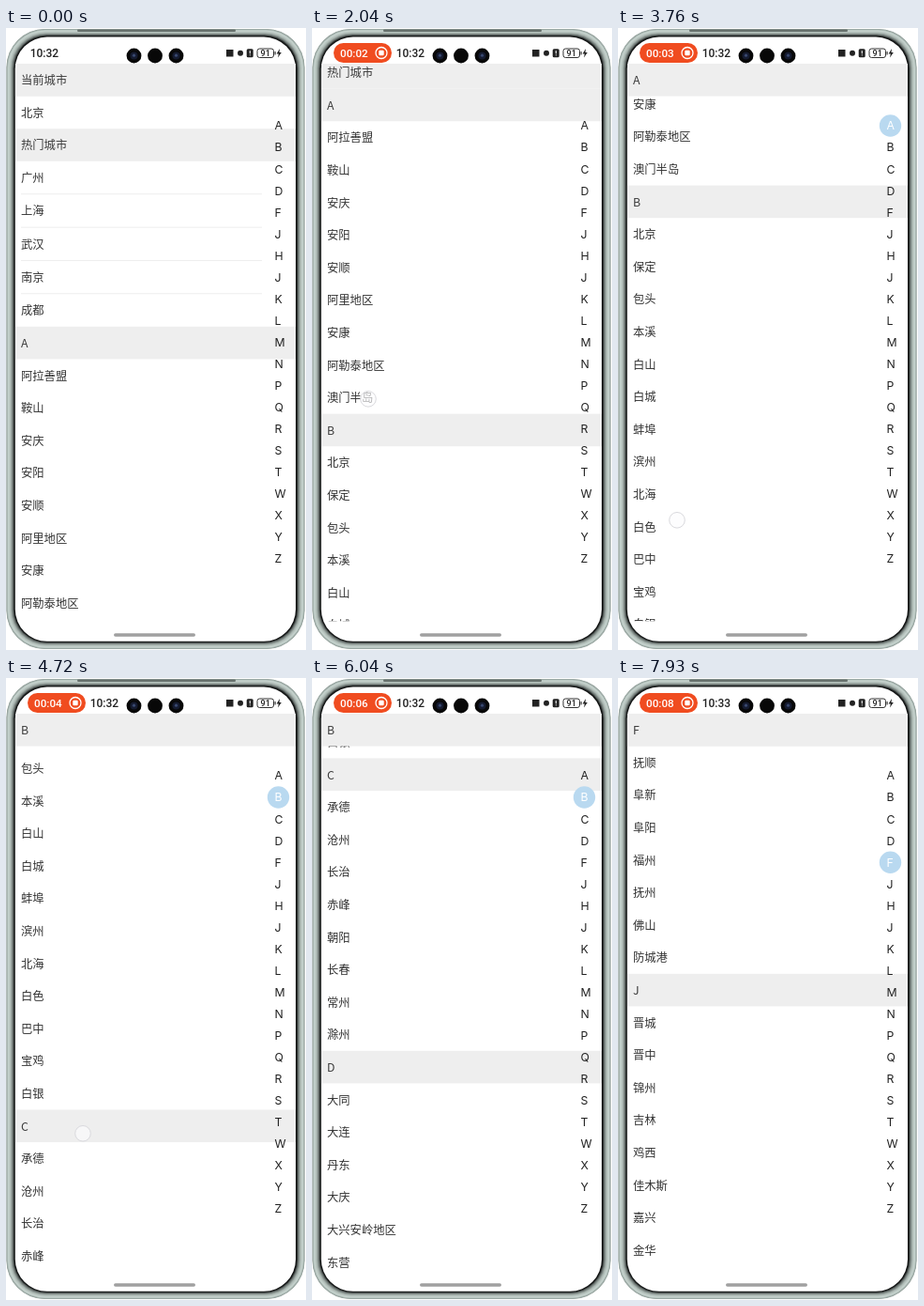
Write an HTML page with a canvas that moves like this. It is 320x662 px and loops after 8000 ms.

```html
<!DOCTYPE html>
<html lang="zh-CN">
<head>
<meta charset="utf-8">
<title>城市列表</title>
<style>
  html, body { margin: 0; width: 100%; height: 100%; overflow: hidden; background: #fff; }
  canvas { display: block; width: 320px; height: 662px; }
</style>
</head>
<body>
<canvas id="stage"></canvas>
<script>
const LOOP = 8000, ROW = 34.6, DIVIDER = 0.75;
const LEFT = 9.8, RIGHT = 309, LIST_TOP = 38, LIST_BOTTOM = 631.3;
const CJK = '12.3px "Noto Sans CJK SC", "Noto Sans CJK", sans-serif';
const INDEX = 'ABCDFJHJKLMNPQRSTWXYZ';

const canvas = document.getElementById('stage');
const ctx = canvas.getContext('2d');
const ratio = window.devicePixelRatio || 1;
canvas.width = 320 * ratio;
canvas.height = 662 * ratio;

const sections = [
  ['当前城市', '北京'],
  ['热门城市', '广州 上海 武汉 南京 成都'],
  ['A', '阿拉善盟 鞍山 安庆 安阳 安顺 阿里地区 安康 阿勒泰地区 澳门半岛'],
  ['B', '北京 保定 包头 本溪 白山 白城 蚌埠 滨州 北海 白色 巴中 宝鸡 白银'],
  ['C', '承德 沧州 长治 赤峰 朝阳 长春 常州 滁州'],
  ['D', '大同 大连 丹东 大庆 大兴安岭地区 东营 德州 东莞 德阳 达州 大理 德宏 迪庆 定西 儋州 登封'],
  ['F', '抚顺 阜新 阜阳 福州 抚州 佛山 防城港'],
  ['J', '晋城 晋中 锦州 吉林 鸡西 佳木斯 嘉兴 金华 济南 济宁'],
].map(([title, names]) => ({ title, names: names.split(' ') }));

let contentHeight = 0;
for (const section of sections) {
  section.divided = section.title === '热门城市';
  section.pitch = ROW + (section.divided ? DIVIDER : 0);
  section.top = contentHeight;
  contentHeight += ROW + section.names.length * section.pitch - (section.divided ? DIVIDER : 0);
}

// Time (ms) and scroll offset, joined by a monotone cubic.
const scrollKeys = [
  [0, 0], [320, 0], [880, 111], [1320, 126], [2040, 253], [2700, 362], [3300, 410],
  [3760, 496], [4240, 606], [4720, 688.5], [5300, 870], [6040, 1062.5], [6700, 1280], [7440, 1423],
];
const JUMP_TIME = 7810;

// Finger contact: start, end, x, and the y it would have at zero scroll.
const touches = [
  [320, 960, 62, 534], [1440, 2200, 60, 648], [3600, 4120, 63, 1020], [4480, 4960, 82, 1173.5],
];

// Phone edge shading: inset from the outer edge and RGB.
const rimStops = [
  [0, [142, 156, 151]], [2, [200, 213, 208]], [4.5, [172, 184, 179]],
  [6.8, [104, 113, 110]], [8.3, [18, 20, 20]], [9.4, [24, 26, 26]],
];

const clamp01 = v => Math.max(0, Math.min(1, v));
const slope = i => (scrollKeys[i + 1][1] - scrollKeys[i][1]) / (scrollKeys[i + 1][0] - scrollKeys[i][0]);

function tangent(i) {
  if (i === 0 || i === scrollKeys.length - 1) return 0;
  const a = slope(i - 1), b = slope(i);
  return a * b > 0 ? 2 * a * b / (a + b) : 0;
}

function scrollAt(t) {
  if (t >= JUMP_TIME) return sections.find(s => s.title === 'F').top;
  const last = scrollKeys.length - 1;
  if (t >= scrollKeys[last][0]) return scrollKeys[last][1];
  const i = scrollKeys.findIndex(key => key[0] > t) - 1;
  const [t0, y0] = scrollKeys[i], [t1, y1] = scrollKeys[i + 1];
  const d = t1 - t0, u = (t - t0) / d, v = 1 - u;
  return y0 * v * v * (1 + 2 * u) + y1 * u * u * (3 - 2 * u)
    + d * u * v * (v * tangent(i) - u * tangent(i + 1));
}

function box(x, y, w, h, r, fill) {
  ctx.beginPath();
  ctx.roundRect(x, y, w, h, r);
  ctx.fillStyle = fill;
  ctx.fill();
}

function disc(x, y, r, fill) {
  ctx.beginPath();
  ctx.arc(x, y, r, 0, Math.PI * 2);
  ctx.fillStyle = fill;
  ctx.fill();
}

function label(text, x, y, font, color) {
  ctx.font = font;
  ctx.fillStyle = color;
  ctx.fillText(text, x, y);
}

function rimColor(inset) {
  const i = Math.max(1, rimStops.findIndex(stop => stop[0] >= inset));
  const [d0, c0] = rimStops[i - 1], [d1, c1] = rimStops[i];
  const u = (inset - d0) / (d1 - d0);
  return `rgb(${c0.map((c, k) => Math.round(c + (c1[k] - c) * u))})`;
}

function drawPhone() {
  for (let d = 0; d <= 9.2; d += 0.4) {
    box(0.4 + d, 1 + d * 0.9, 318.2 - 2 * d, 660 - 1.8 * d, 41 - d * 0.75, rimColor(d));
  }
  box(76, 1.6, 169, 2.4, 1.2, '#66706c');
  box(LEFT, 9.6, RIGHT - LEFT, 643.2, 34, '#fff');
}

function drawHeader(title, y) {
  ctx.fillStyle = '#eee';
  ctx.fillRect(LEFT, y, RIGHT - LEFT, ROW);
  label(title, 16, y + ROW / 2 + 4.8, CJK, '#3a3a3a');
}

function drawList(scroll) {
  ctx.save();
  ctx.beginPath();
  ctx.rect(LEFT, LIST_TOP, RIGHT - LEFT, LIST_BOTTOM - LIST_TOP);
  ctx.clip();
  for (const { title, names, top, pitch, divided } of sections) {
    const y = LIST_TOP + top - scroll;
    drawHeader(title, y);
    names.forEach((name, i) => {
      const rowY = y + ROW + i * pitch;
      label(name, 16, rowY + ROW / 2 + 4.8, CJK, '#333');
      if (divided && i < names.length - 1) {
        ctx.fillStyle = '#e8e8e8';
        ctx.fillRect(16, rowY + ROW, 257, DIVIDER);
      }
    });
  }
  const current = sections.findLastIndex(s => s.top <= scroll + 0.01);
  const next = sections[current + 1];
  const push = next ? Math.min(0, next.top - scroll - ROW) : 0;
  drawHeader(sections[current].title, LIST_TOP + push);
  ctx.restore();
  return sections[current].title;
}

function drawIndex(currentTitle) {
  const selected = INDEX.indexOf(currentTitle);
  [...INDEX].forEach((letter, i) => {
    const y = 104 + i * 23.05;
    if (i === selected) disc(290.5, y, 11.7, '#b9d9f0');
    label(letter, 286.5, y + 4.4, '12.3px Inter, sans-serif', i === selected ? '#fff' : '#222');
  });
}

function drawStatus(t) {
  const enter = 1 - (1 - clamp01((t - 20) / 380)) ** 3;
  const clock = t < 7000 ? '10:32' : '10:33';
  label(clock, 25.7 + 64 * enter, 30.8, '500 12px Roboto, sans-serif', '#222');

  if (enter > 0) {
    ctx.save();
    ctx.beginPath();
    ctx.roundRect(23, 16, 62 * enter, 21, 10.5);
    ctx.clip();
    ctx.fillStyle = '#f04c20';
    ctx.fillRect(23, 16, 62, 21);
    const seconds = Math.floor((t + 100) / 1000);
    label('00:0' + seconds, 30, 30.6, '500 11.7px Roboto, sans-serif', '#fff');
    ctx.beginPath();
    ctx.arc(74, 26.5, 6, 0, Math.PI * 2);
    ctx.strokeStyle = '#fff';
    ctx.lineWidth = 1.3;
    ctx.stroke();
    box(71.3, 23.8, 5.4, 5.4, 1.2, '#fff');
    ctx.restore();
  }

  for (const x of [136.5, 159, 181.5]) {
    disc(x, 29.5, 7.9, '#080808');
    if (x !== 159) {
      disc(x, 29.5, 4, '#151b30');
      disc(x, 29.2, 1.6, '#39486f');
    }
  }

  box(235, 23, 7.5, 7.5, 0, '#222');
  disc(250, 26.8, 3, '#222');
  box(256.7, 22.2, 7, 9, 1.5, '#222');
  box(259.7, 24, 1.1, 3.4, 0.4, '#fff');
  box(259.7, 28.3, 1.1, 1.1, 0.4, '#fff');
  ctx.beginPath();
  ctx.roundRect(268, 22, 17.5, 9.5, 2.5);
  ctx.strokeStyle = '#333';
  ctx.lineWidth = 1;
  ctx.stroke();
  label('91', 271.6, 30.1, '500 9px Roboto, sans-serif', '#222');
  box(286.5, 25, 1.2, 3.6, 0.5, '#333');
  ctx.fillStyle = '#222';
  ctx.fill(new Path2D('M292 22L288.6 27.4H290.8L290 31.6L293.8 25.9H291.5Z'));
}

function drawTouch(t, scroll) {
  for (const [start, end, x, anchor] of touches) {
    const alpha = clamp01(Math.min((t - start) / 80, (end - t) / 120));
    if (alpha <= 0) continue;
    ctx.save();
    ctx.globalAlpha = alpha;
    disc(x, anchor - scroll, 8.3, 'rgba(252,252,253,.65)');
    ctx.strokeStyle = '#d9d9dd';
    ctx.lineWidth = 1;
    ctx.stroke();
    ctx.restore();
  }
}

function render(now) {
  const t = now % LOOP;
  const scroll = scrollAt(t);
  ctx.setTransform(ratio, 0, 0, ratio, 0, 0);
  ctx.fillStyle = '#fff';
  ctx.fillRect(0, 0, 320, 662);
  drawPhone();
  drawIndex(drawList(scroll));
  drawStatus(t);
  drawTouch(t, scroll);
  box(115, 644.3, 87, 3.5, 1.75, '#a0a0a0');
}

const startTime = performance.now();
function tick() {
  render(performance.now() - startTime);
  requestAnimationFrame(tick);
}
tick();
</script>
</body>
</html>
```
